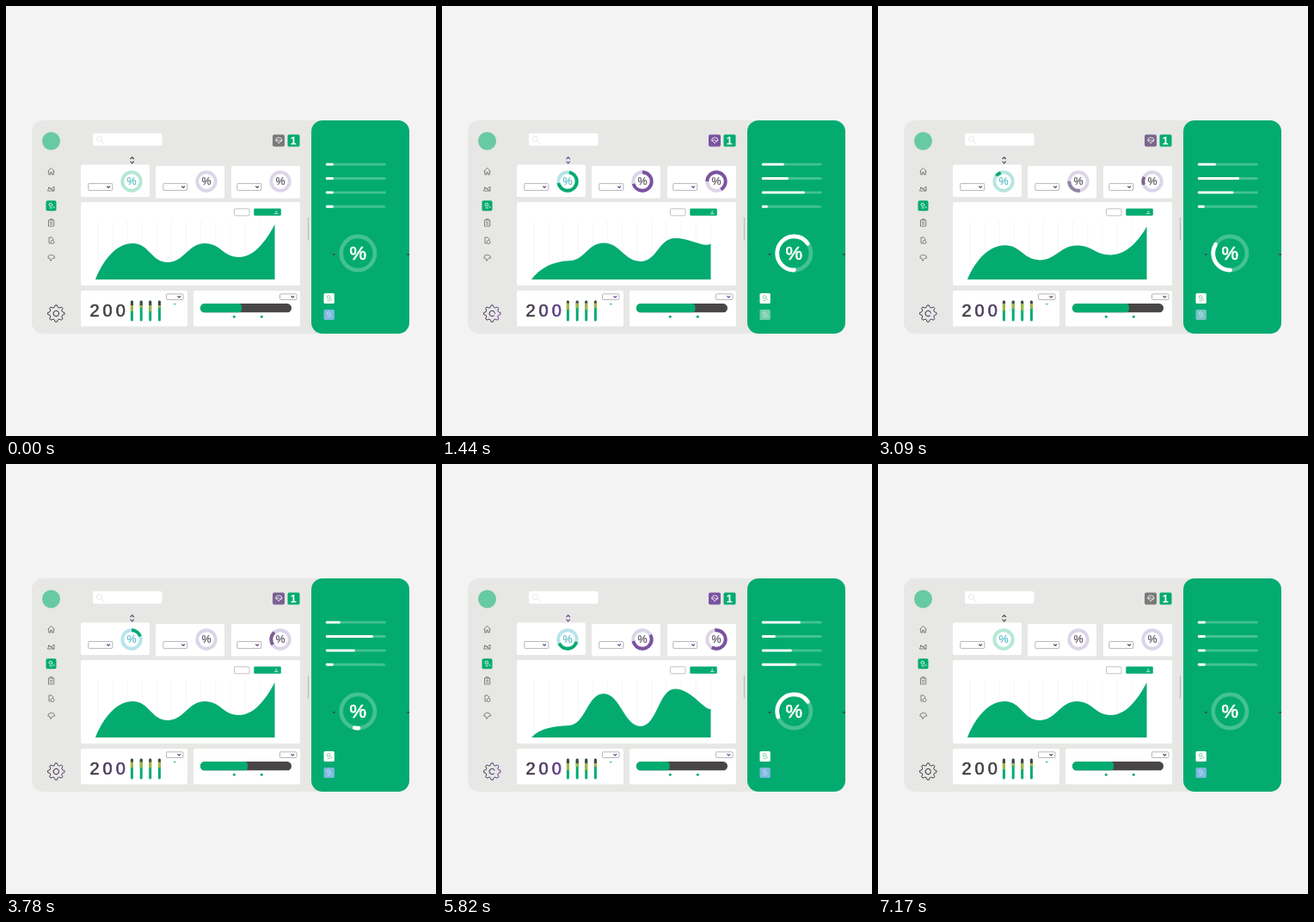
An HTML page that plays this animation: 500 px wide and 500 px high, repeating every 7.23 s.

```html
<!DOCTYPE html>
<html>
<head>
<meta charset="utf-8">
<style>
html, body { margin: 0; width: 100%; height: 100%; overflow: hidden; background: #f3f3f3 }
svg { display: block; width: 100vw; height: 100vh; --accent: #7a7a7a; --ink: #444 }
text { font-family: "Liberation Sans", Arial, sans-serif; text-anchor: middle }
.line { fill: none; stroke: #555; stroke-width: .7; stroke-linejoin: round }
.ink { fill: none; stroke: var(--ink); stroke-width: 1.1 }
.white { fill: none; stroke: #fff; stroke-width: .8 }
</style>
</head>
<body>
<svg id="stage" viewBox="0 0 500 500">
  <defs>
    <linearGradient id="tint"><stop stop-color="#3c3a3e"/><stop offset="1" style="stop-color:var(--ink)"/></linearGradient>
    <clipPath id="pill"><rect x="226" y="346" width="106" height="10.5" rx="5.2"/></clipPath>
  </defs>
  <rect x="30" y="133" width="439" height="248" rx="13" fill="#e7e7e5"/>
  <rect x="355" y="133" width="114" height="248" rx="13" fill="#03ab70"/>
  <circle cx="52.5" cy="157" r="10.5" fill="#68caa2"/>

  <rect x="101" y="148" width="80.5" height="14.5" rx="2" fill="#fff"/>
  <g class="line" style="stroke:#ddd"><circle cx="108.5" cy="154.5" r="3"/><path d="M111 157l3 3"/></g>
  <rect x="310" y="149.5" width="14" height="14" rx="2" style="fill:var(--accent)"/>
  <path class="white" d="M313.5 156.5q0-3.5 3.7-3.7 3.8.2 3.8 3.7l-2.2 1-1.6 2.2-1.6-2.2zM314 156.5l2.5-1 2 1.5 2-1"/>
  <rect x="327.5" y="149.5" width="14" height="14" rx="1.5" fill="#03ab70"/>
  <text x="334.2" y="161" font-size="13" font-weight="700" fill="#fff">1</text>
  <path class="ink" d="M144.6 178l2.1-2.2 2.1 2.2M144.6 180.7l2.1 2.2 2.1-2.2"/>

  <g class="line">
    <path d="M48.5 192.5l4-4.3 4 4.3M49.7 191.5v4.5h2v-2.7h1.7v2.7h2v-4.5"/>
    <path d="M48.5 215h7.5v-5l-4 3-2-2zM49 210.5l7 4.5"/>
    <path d="M49.5 249h6.2v7h-6.2zM51.2 249v-1.2h2.8v1.2M51 251.5h3.2M51 253.5h3.2"/>
    <path d="M55 272v-1l-2-2h-3v7h1.5"/><circle cx="54" cy="274.5" r="2"/>
    <path d="M48.7 293q0-3.5 4-3.7 4 .2 4 3.7l-2.8.5-2 3-1-3z"/>
  </g>
  <rect x="46.5" y="226.3" width="12" height="12" rx="1.8" fill="#03ab70"/>
  <g class="white"><circle cx="51.8" cy="231" r="1.8"/><path d="M50.5 234.8h3.5M54.5 232.5l2 2.5"/></g>
  <g id="gear" fill="none" stroke="url(#tint)"></g>

  <g fill="#fff">
    <rect x="87" y="184.5" width="80" height="37.5" rx="2"/>
    <rect x="174" y="186" width="80" height="37.5" rx="2"/>
    <rect x="262" y="186" width="80" height="37.5" rx="2"/>
    <rect x="87" y="228" width="255" height="97" rx="2"/>
    <rect x="87" y="331" width="124" height="41.5" rx="2"/>
    <rect x="218" y="331" width="124" height="41.5" rx="2"/>
  </g>
  <g id="menus"></g>
  <g id="rings"></g>

  <path id="grid" stroke="#f6f6f6"/>
  <path id="area" fill="#03ab70"/>
  <rect x="265.5" y="235.8" width="17.5" height="8" rx="1" class="line" style="stroke:#aaa"/>
  <rect x="288.3" y="235.5" width="31.5" height="8.3" rx="1.2" fill="#03ab70"/>
  <path class="white" d="M312 241.3h4.5M314.2 238v2.4"/>
  <path d="M351.5 246v26.5" stroke="#bbb" stroke-width="1.2"/>

  <text x="120.2" y="361" font-size="20" letter-spacing="4" fill="url(#tint)" stroke="url(#tint)" stroke-width=".6">200</text>
  <path d="M195 346.7h2.5" stroke="#03ab70"/>
  <g id="columns"></g>
  <g clip-path="url(#pill)">
    <rect x="226" y="346" width="106" height="10.5" fill="#484546"/>
    <rect id="progress" x="210" y="346" height="10.5" rx="4" fill="#03ab70"/>
  </g>
  <g fill="#03ab70"><circle cx="265.3" cy="361.3" r="1.5"/><circle cx="297.3" cy="361.3" r="1.5"/></g>

  <g id="sliders"></g>
  <path d="M438.5 231.5l3 2" stroke="#03ab70"/>
  <path d="M379 288h4.2l-2.1 2.4zM465.5 288h4l-2 2.4z" fill="#3c5147"/>
  <rect x="369.5" y="334" width="12.3" height="12" rx="1.5" fill="#fff"/>
  <rect id="badge" x="369.5" y="353" width="12.3" height="12" rx="1.5"/>
  <g class="line" style="stroke:#55b990"><circle cx="375" cy="338.5" r="1.8"/><path d="M373.5 342.5h3.5M377 339.5l2 3"/></g>
  <g class="white" opacity=".6"><circle cx="375" cy="357.5" r="1.8"/><path d="M373.5 361.5h3.5M377 358.5l2 3"/></g>
</svg>
<script>
const LOOP = 7230;
const TIMES = [0, 1440, 2430, 3780, 4950, 5820, 7170];
const $ = id => document.getElementById(id);

function add(parent, tag, attrs) {
  const el = document.createElementNS('http://www.w3.org/2000/svg', tag);
  set(el, attrs);
  parent.appendChild(el);
  return el;
}
function set(el, attrs) {
  for (const name in attrs) el.setAttribute(name, attrs[name]);
}
const mix = (a, b, p) => a + (b - a) * p;
const blend = (a, b, p) => `rgb(${a.map((v, i) => Math.round(mix(v, b[i], p)))})`;
const smooth = p => p * p * (3 - 2 * p);
const cubic = p => p < .5 ? 4 * p ** 3 : 1 - 4 * (1 - p) ** 3;
const ramp = (t, from, span) => cubic(Math.min(1, Math.max(0, (t - from) / span)));

// Eased value at time t of a track with one value per entry of TIMES.
function at(track, t) {
  if (t >= TIMES[6]) return track[6];
  const i = TIMES.findIndex(k => k > t) - 1;
  return mix(track[i], track[i + 1], smooth((t - TIMES[i]) / (TIMES[i + 1] - TIMES[i])));
}

// Rings: arc start and end in degrees clockwise from the top.
const rings = [
  { x: 146, y: 204, from: [0, 10, 260, 360, 375, 465, 605], to: [0, 260, 260, 430, 600, 605, 605], color: '#03ab70' },
  { x: 233, y: 204, from: [0, 0, -10, 360, 360, 420, 620], to: [0, 255, 190, 360, 520, 620, 620] },
  { x: 319, y: 204, from: [270, 270, 262, 235, 270, 350, 570], to: [270, 510, 278, 320, 510, 570, 570] },
  { x: 409.3, y: 287.5, from: [180, 180, 180, 178, 180, 250, 420], to: [180, 415, 405, 192, 365, 415, 420], color: '#fff', big: true }
];
for (const r of rings) {
  const shape = {
    cx: r.x, cy: r.y, r: r.big ? 19.6 : 10.7, fill: 'none', 'stroke-width': r.big ? 4.7 : 3.9,
    pathLength: 360, transform: `rotate(-90 ${r.x} ${r.y})`
  };
  r.base = add($('rings'), 'circle', { ...shape, stroke: r.big ? '#43c195' : '#dcd5e8' });
  r.arc = add($('rings'), 'circle', { ...shape, stroke: r.color || 'var(--accent)', 'stroke-linecap': r.big ? 'round' : 'butt' });
  r.label = add($('rings'), 'text', {
    x: r.x, y: r.y + (r.big ? 7.5 : 4.2), 'font-size': r.big ? 22 : 12.5, fill: r.big ? '#fff' : '#5b5560',
    stroke: r.big ? '#fff' : '#5b5560', 'stroke-width': r.big ? .7 : .2
  });
  r.label.textContent = '%';
}
set(rings[0].label, { fill: '#58bcc4', stroke: '#58bcc4' });

// Dropdown boxes: x, y, width, height
for (const [x, y, w, h] of [[95.8, 206.4, 28, 8], [182.8, 206.4, 28, 8], [268.8, 206.4, 28, 8], [186.5, 334.8, 19.5, 6.7], [318.5, 334.8, 19.5, 6.7]]) {
  add($('menus'), 'rect', { x, y, width: w, height: h, rx: 1, class: 'line', style: 'stroke:#999' });
  add($('menus'), 'path', { d: `M${x + w - 6.5} ${y + h / 2 - .9}l1.8 1.8 1.8-1.8`, class: 'ink' });
}

const sliders = [
  [9, 26, 25, 17, 47, 45, 9],
  [9, 31, 42, 55, 26, 16, 9],
  [9, 50, 49, 34, 44, 35, 9],
  [9, 7, 7, 9, 40, 40, 9]
].map((track, i) => {
  const bar = { x: 371.8, y: 182.7 + i * 16.35, width: 70, height: 2.9, rx: 1.3 };
  add($('sliders'), 'rect', { ...bar, fill: '#43c195' });
  return { track, el: add($('sliders'), 'rect', { ...bar, fill: '#fff' }) };
});

// Small columns: heights of the dark and the lime parts
const darkEnd = [5, 2.5, 2.5, 3.5, 4, 5, 5];
const columns = [146.4, 157.2, 167.7, 178.4].map((x, i) => {
  const stroke = (color, cap) => add($('columns'), 'path', { stroke: color, 'stroke-width': 3, 'stroke-linecap': cap });
  const green = stroke('#03ab70', 'round'), dark = stroke('#484546', 'round'), lime = stroke('#a8b545', 'butt');
  set(green, { d: `M${x} 344v21` });
  const drop = i % 2 ? -2 : 0;
  return { x, dark, lime, limeEnd: [12, 10, 12, 10, 14, 13, 12].map((v, k) => v + (k % 6 ? drop * (k % 3) : drop * 2)) };
});

// Gear outline
const teeth = [];
for (let i = 0; i < 32; i++) {
  const a = (i - .5) * Math.PI / 16, r = i % 4 < 2 ? 9.8 : 7.4;
  teeth.push(`${58.3 + r * Math.cos(a)} ${357.6 + r * Math.sin(a)}`);
}
add($('gear'), 'path', { d: `M${teeth.join('L')}Z`, 'stroke-linejoin': 'round' });
const hub = add($('gear'), 'circle', { cx: 58.3, cy: 357.6, r: 3.1, pathLength: 360, transform: 'rotate(40 58.3 357.6)' });
const hubArc = [360, 330, 280, 360, 280, 300, 360];

let lines = '';
for (let x = 107; x < 316; x += 17.1) lines += `M${x} 250V318`;
set($('grid'), { d: lines });

const areaX = [104, 147.5, 188, 231, 271, 312.5];
const areaA = [318, 276, 298, 276, 292, 254];
const areaB = [318, 304, 267, 305, 261.5, 285];
function areaPath(p) {
  const y = areaA.map((v, i) => mix(v, areaB[i], p));
  let d = `M104 318C${mix(111, 114, p)} ${mix(300, 307, p)} ${mix(126, 130, p)} ${y[1] + mix(0, 1, p)} ${areaX[1]} ${y[1]}`;
  for (let i = 2; i < 6; i++) {
    const x0 = areaX[i - 1], x1 = areaX[i], last = i === 5;
    const endX = last ? 304 : x1 - 19, endY = last ? mix(270, 286, p) : y[i];
    d += `C${x0 + 19} ${y[i - 1]} ${endX} ${endY} ${x1} ${y[i]}`;
  }
  return d + 'V318Z';
}

const accent = [0, 1, .35, .65, 1, 1, 0];
const blueBase = [0, .8, .1, 1, 1, 1, 0];
const badgeBlue = [1, 0, 0, 1, 1, 1, 1];
const progressEnd = [274, 294.5, 302, 281, 262.5, 264.5, 274];

function draw(t) {
  const k = at(accent, t);
  $('stage').style.setProperty('--accent', blend([122, 122, 122], [122, 83, 160], k));
  $('stage').style.setProperty('--ink', blend([68, 68, 68], [102, 62, 150], k));

  for (const r of rings) {
    const from = at(r.from, t), len = Math.max(0, Math.min(360, at(r.to, t) - from));
    set(r.arc, { 'stroke-dasharray': `${len} ${360 - len}`, 'stroke-dashoffset': -from, opacity: len < 1 ? 0 : 1 });
  }
  if (+rings[1].arc.getAttribute('opacity')) set(rings[1].arc, { opacity: .5 + .5 * k });
  set(rings[0].base, { stroke: blend([181, 232, 211], [184, 227, 236], at(blueBase, t)) });

  const s = t % 3585;
  set($('area'), { d: areaPath(ramp(s, 675, 1300) - ramp(s, 2150, 1300)) });
  set($('progress'), { width: at(progressEnd, t) - 210 });
  for (const { el, track } of sliders) set(el, { width: at(track, t) });
  for (const c of columns) {
    const top = at(darkEnd, t);
    set(c.dark, { d: `M${c.x} 344V${343 + top}` });
    set(c.lime, { d: `M${c.x} ${343 + top}V${343 + Math.max(top + 1, at(c.limeEnd, t))}` });
  }
  const arc = at(hubArc, t);
  set(hub, { 'stroke-dasharray': `${arc} ${360 - arc}` });
  set($('badge'), { fill: blend([118, 206, 171], [125, 184, 224], at(badgeBlue, t)) });
}

function tick() {
  draw(performance.now() % LOOP);
  requestAnimationFrame(tick);
}
tick();
</script>
</body>
</html>
```
